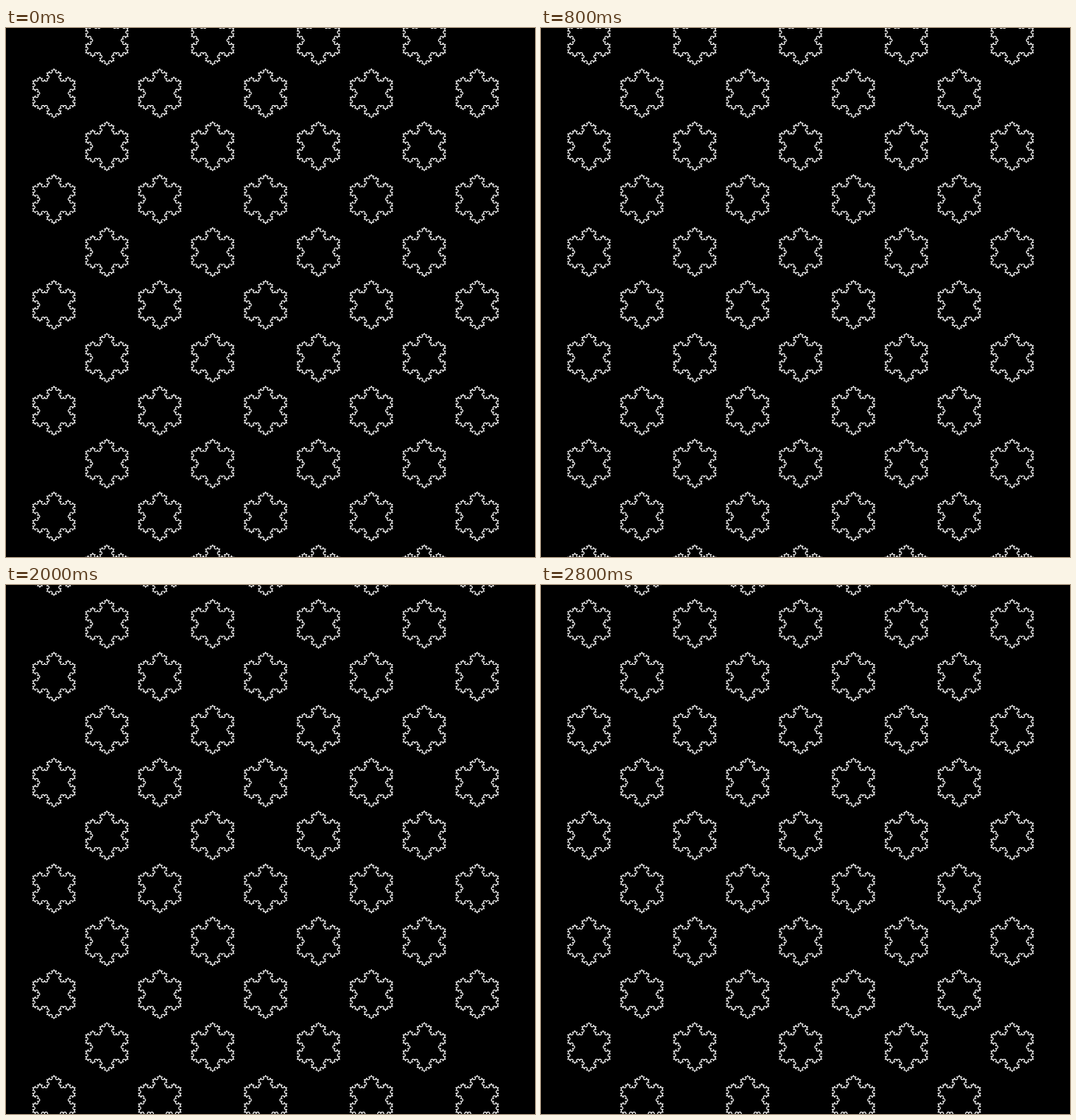
An HTML page with a canvas for the animation above (3200 ms loop, 748 by 748 pixels).

```html
<!DOCTYPE html>
<html lang="en">
<head>
<meta charset="utf-8">
<title>Falling snowflakes</title>
<style>
  html, body { margin: 0; width: 100%; height: 100%; overflow: hidden; background: #000; }
  canvas { display: block; }
</style>
</head>
<body>
<canvas id="stage" width="748" height="748"></canvas>
<script>
const SIZE = 748;
const UNIT = SIZE / 10;
const SIDE = UNIT * 0.8;
const STEP_MS = 400;
const STEPS = 4;
const DEPTH = 3;
const ctx = document.getElementById("stage").getContext("2d");

// Adds the Koch curve from a to b, without its first point.
function koch(path, [ax, ay], [bx, by], depth) {
  if (depth === 0) {
    path.lineTo(bx, by);
    return;
  }
  const dx = (bx - ax) / 3, dy = (by - ay) / 3;
  const h = Math.sqrt(3) / 2;
  const p = [ax + dx, ay + dy];
  const q = [bx - dx, by - dy];
  const tip = [p[0] + dx / 2 + dy * h, p[1] + dy / 2 - dx * h];
  const points = [[ax, ay], p, tip, q, [bx, by]];
  for (let i = 0; i < 4; i++) koch(path, points[i], points[i + 1], depth - 1);
}

function makeFlake() {
  const radius = SIDE / Math.sqrt(3);
  const corner = i => {
    const angle = -Math.PI / 2 + i * Math.PI * 2 / 3;
    return [radius * Math.cos(angle), radius * Math.sin(angle)];
  };
  const path = new Path2D();
  path.moveTo(...corner(0));
  for (let i = 0; i < 3; i++) koch(path, corner(i), corner(i + 1), DEPTH);
  path.closePath();
  return path;
}

const flake = makeFlake();
const left = UNIT / 2 + SIDE / 2 + 0.5;
const top0 = SIDE * Math.sqrt(3) / 6 + 0.3;

function draw(step) {
  ctx.setTransform(1, 0, 0, 1, 0, 0);
  ctx.fillStyle = "#000";
  ctx.fillRect(0, 0, SIZE, SIZE);
  ctx.strokeStyle = "#fff";
  ctx.lineWidth = 1.15;
  for (let row = -3; row <= 10; row++) {
    const y = top0 + row * UNIT + step * UNIT / 2;
    const odd = row % 2 === 0;
    for (let col = odd ? 1 : 0; col < 9; col += 2) {
      ctx.setTransform(1, 0, 0, 1, left + col * UNIT, y);
      ctx.stroke(flake);
    }
  }
}

const start = performance.now();
let shown = -1;

function tick() {
  const step = Math.floor((performance.now() - start) / STEP_MS) % STEPS;
  if (step !== shown) draw(shown = step);
  requestAnimationFrame(tick);
}
tick();
</script>
</body>
</html>
```
